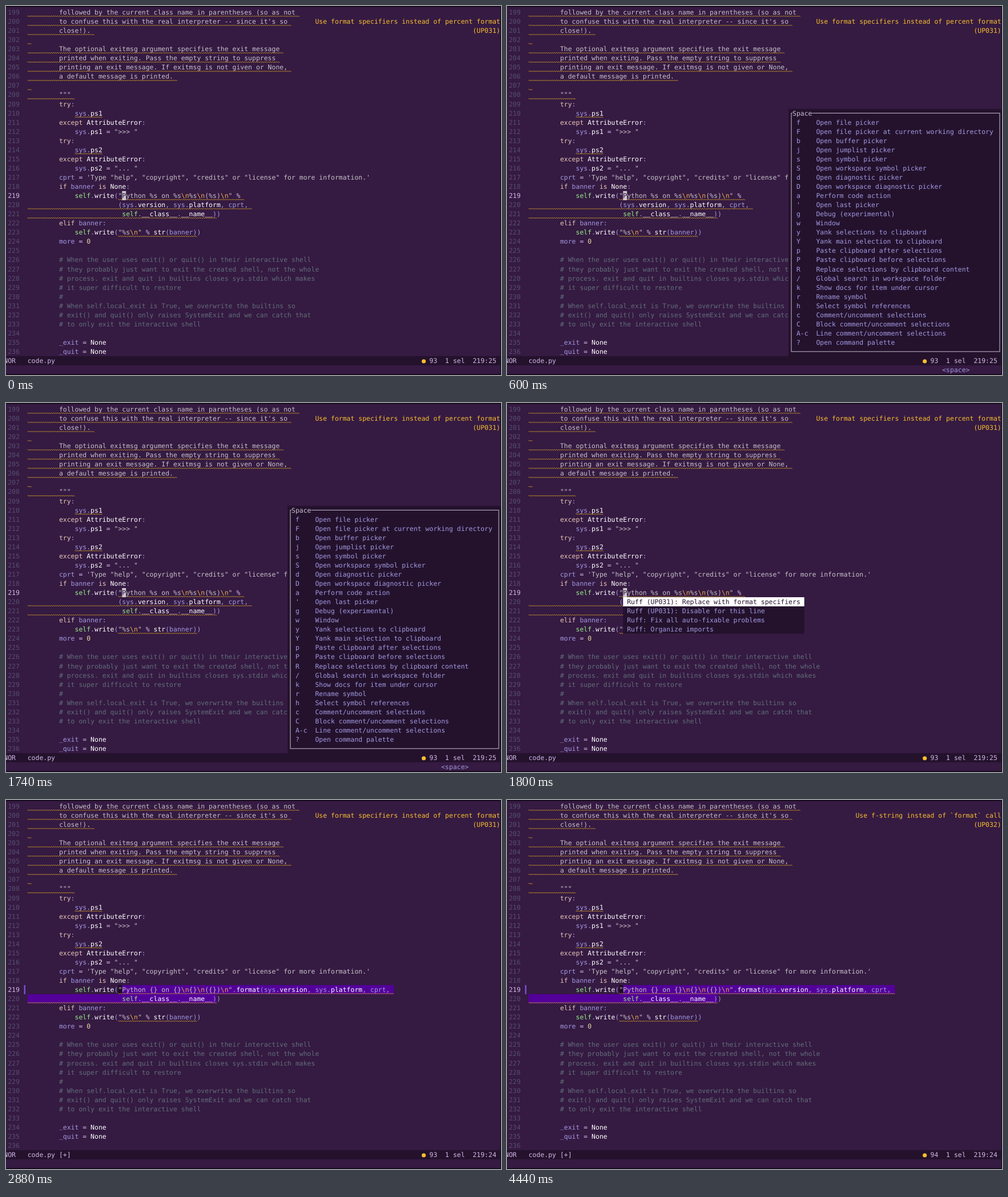
Write an HTML page with a canvas that moves like this. It is 867 by 646 pixels and loops after 4.5 s.

```html
<!DOCTYPE html>
<html lang="en">
<head>
<meta charset="utf-8">
<title>Code action in a terminal editor</title>
<style>
html, body { margin: 0; width: 100%; height: 100%; overflow: hidden; background: #351a42; }
canvas { display: block; }
</style>
</head>
<body>
<canvas id="stage" width="867" height="646"></canvas>
<script>
const ctx = document.getElementById('stage').getContext('2d');
const LOOP = 4500, POPUP_AT = 600, MENU_AT = 1800, EDIT_AT = 2880, CHECK_AT = 3060;
const CW = 6.9, RH = 16.054, X0 = 37.7;
const C = {
  bg: '#351a42', panel: '#24122d', edge: '#0c0611', lavender: '#a199df', lilac: '#d2b8e6',
  silver: '#c6c2c8', comment: '#616f78', lineNo: '#574f70', white: '#ffffff', keyword: '#e6c8b6',
  mint: '#98ec88', honey: '#eaae4c', number: '#e8dca0', warn: '#f8bf2e', curl: '#dcaa26',
  select: '#53009a', border: '#c9bfd0'
};

const docLines = `followed by the current class name in parentheses (so as not
to confuse this with the real interpreter -- since it's so
close!).

The optional exitmsg argument specifies the exit message
printed when exiting. Pass the empty string to suppress
printing an exit message. If exitmsg is not given or None,
a default message is printed.

"""`.split('\n').map(s => s && ' '.repeat(8) + s);

const head = String.raw`
        try:
            sys.ps1
        except AttributeError:
            sys.ps1 = ">>> "
        try:
            sys.ps2
        except AttributeError:
            sys.ps2 = "... "
        cprt = 'Type "help", "copyright", "credits" or "license" for more information.'
        if banner is None:`.split('\n').slice(1);

const callBefore = String.raw`
            self.write("Python %s on %s\n%s\n(%s)\n" %
                       (sys.version, sys.platform, cprt,
                        self.__class__.__name__))`.split('\n').slice(1);

const callAfter = String.raw`
            self.write("Python {} on {}\n{}\n({})\n".format(sys.version, sys.platform, cprt,
                        self.__class__.__name__))`.split('\n').slice(1);

const tail = String.raw`
        elif banner:
            self.write("%s\n" % str(banner))
        more = 0

        # When the user uses exit() or quit() in their interactive shell
        # they probably just want to exit the created shell, not the whole
        # process. exit and quit in builtins closes sys.stdin which makes
        # it super difficult to restore
        #
        # When self.local_exit is True, we overwrite the builtins so
        # exit() and quit() only raises SystemExit and we can catch that
        # to only exit the interactive shell

        _exit = None
        _quit = None`.split('\n').slice(1);

const spaceItems = `f Open file picker
F Open file picker at current working directory
b Open buffer picker
j Open jumplist picker
s Open symbol picker
S Open workspace symbol picker
d Open diagnostic picker
D Open workspace diagnostic picker
a Perform code action
' Open last picker
g Debug (experimental)
w Window
y Yank selections to clipboard
Y Yank main selection to clipboard
p Paste clipboard after selections
P Paste clipboard before selections
R Replace selections by clipboard content
/ Global search in workspace folder
k Show docs for item under cursor
r Rename symbol
h Select symbol references
c Comment/uncomment selections
C Block comment/uncomment selections
A-c Line comment/uncomment selections
? Open command palette`.split('\n');

const actions = [
  'Ruff (UP031): Replace with format specifiers',
  'Ruff (UP031): Disable for this line',
  'Ruff: Fix all auto-fixable problems',
  'Ruff: Organize imports'
];

const colX = col => X0 + col * CW;
const midY = row => 11 + row * RH;

function text(col, row, str, color) {
  ctx.fillStyle = color;
  [...str].forEach((ch, i) => {
    // underscores sit just above the warning curl
    const y = midY(row) + (ch === '_' ? 2.6 : 4);
    if (ch !== ' ') ctx.fillText(ch, colX(col + i), y);
  });
}

function cells(col, row, cols, rows, color) {
  const y = Math.round(midY(row) - RH / 2);
  ctx.fillStyle = color;
  ctx.fillRect(colX(col), y, cols * CW, Math.round(midY(row + rows) - RH / 2) - y);
}

function curl(row, from, to) {
  const left = colX(from), right = colX(to), y = midY(row) + 6.9;
  ctx.strokeStyle = C.curl;
  ctx.lineWidth = 1;
  ctx.beginPath();
  for (let x = left; x <= right; x += 0.4) {
    ctx.lineTo(x, y - 0.6 * Math.sin((x - left) / CW * 4 * Math.PI));
  }
  ctx.stroke();
}

const TOKEN = /(#.*)|("[^"]*"|'[^']*')|\b(try|except|if|elif|is)\b|\b(self)\b|((?<=\.)\w+|\b(?:None|AttributeError|str)\b)|\b(\d+)\b|([=%])|\w+|./g;
const TOKEN_COLORS = [C.comment, C.silver, C.keyword, C.mint, C.white, C.number, C.lilac];

function code(row, line) {
  for (const m of line.matchAll(TOKEN)) {
    const kind = m.slice(1).findIndex(g => g !== undefined);
    if (kind !== 1) {
      text(m.index, row, m[0], TOKEN_COLORS[kind] || C.lavender);
      continue;
    }
    let col = m.index;
    for (const part of m[0].split(/(\\n)/)) {
      text(col, row, part, part === '\\n' ? C.honey : C.silver);
      col += part.length;
    }
  }
}

function drawCurls(edited) {
  docLines.forEach((s, i) => curl(i, 0, s.length + 1));
  curl(11, 12, 19);
  curl(15, 12, 19);
  curl(20, 23, edited ? 93 : 55);
  if (!edited) curl(21, 0, 57);
  curl(edited ? 21 : 22, 0, 48);
  curl(edited ? 23 : 24, 23, 43);
}

function drawEditor(edited, checked) {
  const body = [...head, ...(edited ? callAfter : callBefore), ...tail];
  if (edited) {
    cells(23, 20, 70, 1, C.select);
    cells(0, 21, 48, 1, C.select);
    cells(23, 20, 1, 1, '#1c0c25');
    ctx.fillStyle = '#7a4fd0';
    ctx.fillRect(31.5, 324, 2.5, 16);
  }
  drawCurls(edited);
  for (let i = 0; i < 38; i++) text(-5, i, String(199 + i), i === 20 ? C.lilac : C.lineNo);
  docLines.forEach((s, i) => text(0, i, s, C.silver));
  body.forEach((s, i) => code(i + 10, s));

  if (!edited) {
    cells(24, 20, 1, 1, '#cbc7cf');
    text(24, 20, 'P', C.bg);
  }
  const message = checked
    ? 'Use f-string instead of `format` call'
    : 'Use format specifiers instead of percent format';
  text(120 - message.length, 1, message, C.warn);
  text(113, 2, checked ? '(UP032)' : '(UP031)', C.warn);
}

function drawStatus(edited, checked) {
  cells(-6, 38, 127, 1, C.panel);
  text(-6, 38, 'NOR', C.lilac);
  text(0, 38, edited ? 'code.py [+]' : 'code.py', C.lilac);
  ctx.fillStyle = C.warn;
  ctx.beginPath();
  ctx.arc(731.7, 622, 3.6, 0, 7);
  ctx.fill();
  text(102, 38, checked ? '94' : '93', C.lilac);
  text(106, 38, '1 sel', C.lilac);
  text(113, 38, edited ? '219:24' : '219:25', C.lilac);
}

function drawPopup() {
  cells(66, 11, 54, 27, C.panel);
  ctx.strokeStyle = C.border;
  ctx.lineWidth = 1;
  ctx.strokeRect(498, midY(11), 365, 26 * RH);
  cells(67, 11, 5, 1, C.panel);
  text(67, 11, 'Space', C.border);
  spaceItems.forEach((item, i) => {
    const gap = item.indexOf(' ');
    text(68, 12 + i, item.slice(0, gap), C.lavender);
    text(73, 12 + i, item.slice(gap + 1), C.lavender);
  });
  text(105, 39, '<space>', C.lavender);
}

function drawMenu() {
  cells(24, 21, 46, 4, C.panel);
  cells(24, 21, 46, 1, C.white);
  actions.forEach((s, i) => text(25, 21 + i, s, i ? C.lavender : C.panel));
}

function draw(t) {
  const edited = t >= EDIT_AT, checked = t >= CHECK_AT;
  ctx.font = '11.46px "DejaVu Sans Mono", monospace';
  ctx.textRendering = 'geometricPrecision';
  ctx.fillStyle = C.bg;
  ctx.fillRect(0, 0, 867, 646);
  drawEditor(edited, checked);
  drawStatus(edited, checked);
  if (t >= POPUP_AT && t < MENU_AT) drawPopup();
  if (t >= MENU_AT && !edited) drawMenu();
  ctx.fillStyle = C.edge;
  ctx.fillRect(0, 0, 867, 1.5);
  ctx.fillRect(0, 644.5, 867, 1.5);
  ctx.fillRect(866, 0, 1, 646);
}

const start = performance.now();
function tick() {
  draw((performance.now() - start) % LOOP);
  requestAnimationFrame(tick);
}
tick();
</script>
</body>
</html>
```
